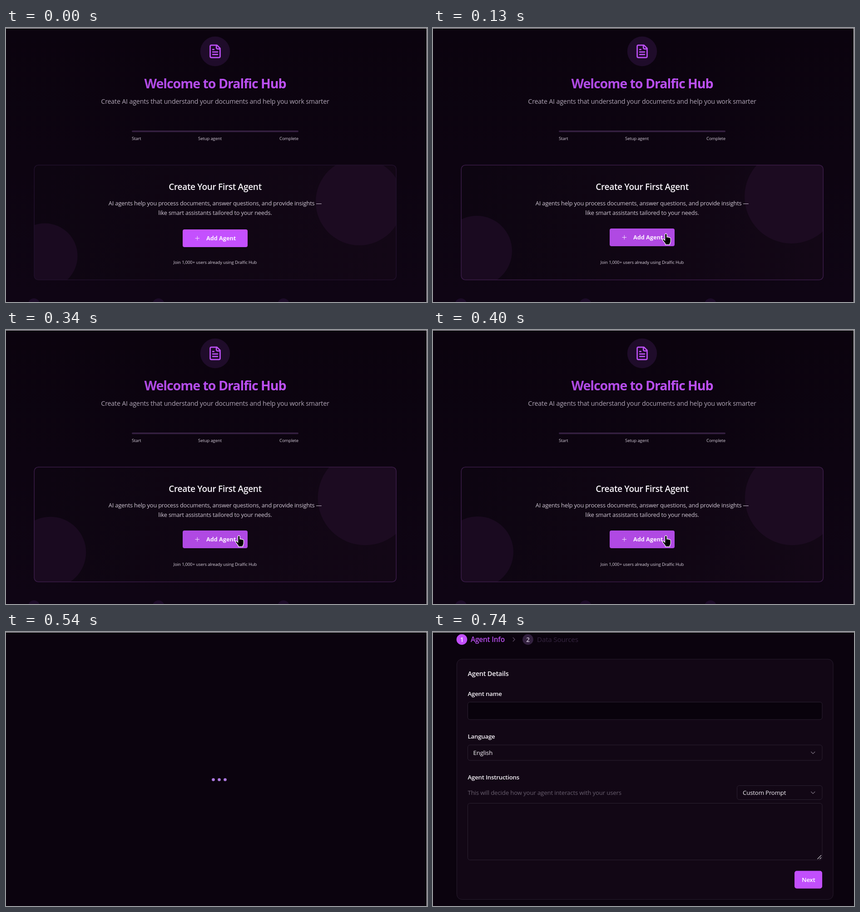
Write an HTML page with a canvas that moves like this. It is 927 px wide and 604 px high and loops after 1.67 s.

```html
<!DOCTYPE html>
<html lang="en">
<head>
<meta charset="utf-8">
<title>Agent setup</title>
<style>
html, body { margin: 0; width: 100%; height: 100%; overflow: hidden; background: #0b030e; }
canvas { display: block; }
</style>
</head>
<body>
<canvas id="stage" width="927" height="604"></canvas>
<script>
const ctx = document.getElementById('stage').getContext('2d');
const W = 927, H = 604, LOOP = 1670;
const ACCENT = '#c24ffc', BACK = '#0b030e', LINE = '#2b2131';

// Start time in ms and hover progress of the welcome card
const HOVER = [[0, 0], [70, 0.6], [130, 0.76], [200, 0.81], [340, 0.86], [400, 0.9], [470, 0.94]];
const LOADER_AT = 540, FORM_AT = 740;

const FILE_ICON = new Path2D('M15 2H6a2 2 0 0 0-2 2v16a2 2 0 0 0 2 2h12a2 2 0 0 0 2-2V7Z' +
  'M14 2v4a2 2 0 0 0 2 2h4M10 9H8M16 13H8M16 17H8');
const HAND = new Path2D('M510.6 455q2.2-3.6 4.4 0V461q2.2-1.2 3.2.5q2-1 3 .8q2.2-.4 2.2 2V470' +
  'q-.3 3-2 5V477.6H511.6V475.4L505.6 467.6q-.6-3 2-2.4L510.6 468Z');

const mix = (a, b, p) => a + (b - a) * p;
const blend = (a, b, p) => `rgb(${a.map((v, i) => Math.round(mix(v, b[i], p)))})`;

function gradient(x0, y0, x1, y1, from, to) {
  const g = ctx.createLinearGradient(x0, y0, x1, y1);
  g.addColorStop(0, from);
  g.addColorStop(1, to);
  return g;
}

function text(str, x, y, size, color, { weight = 400, align = 'left', track } = {}) {
  const px = size * 0.97;
  const em = track ?? (weight >= 700 ? 0 : weight >= 600 ? -0.017 : -0.0134);
  ctx.font = `${weight} ${px}px "Open Sans", "Noto Sans", sans-serif`;
  ctx.letterSpacing = `${em * px}px`;
  ctx.textAlign = align;
  ctx.fillStyle = color;
  ctx.fillText(str, x, y);
}

function disc(x, y, r, color) {
  ctx.beginPath();
  ctx.arc(x, y, r, 0, Math.PI * 2);
  ctx.fillStyle = color;
  ctx.fill();
}

function box(x, y, w, h, r, fill, stroke, width = 1) {
  ctx.beginPath();
  ctx.roundRect(x, y, w, h, r);
  if (fill) {
    ctx.fillStyle = fill;
    ctx.fill();
  }
  if (stroke) {
    ctx.strokeStyle = stroke;
    ctx.lineWidth = width;
    ctx.stroke();
  }
}

function polyline(color, width, ...pts) {
  ctx.beginPath();
  pts.forEach(([x, y]) => ctx.lineTo(x, y));
  ctx.strokeStyle = color;
  ctx.lineWidth = width;
  ctx.stroke();
}

function backdrop(fill, rightEdge) {
  ctx.fillStyle = fill;
  ctx.fillRect(0, 0, W, H);
  ctx.fillStyle = '#d2cfd4';
  ctx.fillRect(0, 0, W, 1);
  if (rightEdge) ctx.fillRect(W - 1, 0, 1, H);
}

function header() {
  disc(460.5, 51.5, 32.7, '#1f0c2a');
  ctx.save();
  ctx.translate(460.5, 51.5);
  ctx.scale(1.365, 1.365);
  ctx.translate(-12, -12);
  ctx.lineWidth = 2;
  ctx.lineCap = ctx.lineJoin = 'round';
  ctx.strokeStyle = '#bd50f5';
  ctx.stroke(FILE_ICON);
  ctx.restore();

  const mid = { align: 'center' };
  text('Welcome to Dralfic Hub', 460.5, 132.5, 29.5, gradient(303, 0, 618, 0, '#ae4ae2', '#bf51f8'),
    { weight: 700, align: 'center', track: -0.037 });
  text('Create AI agents that understand your documents and help you work smarter',
    460.5, 167, 14.74, '#b0a5b6', mid);

  box(277, 226, 367, 3.4, 1.7, '#352041');
  const label = '#d3cbd8';
  text('Start', 277, 246.5, 9.84, label);
  text('Setup agent', 449, 246.5, 9.84, label, mid);
  text('Complete', 644, 246.5, 9.84, label, { align: 'right' });
}

function welcomeCard(p) {
  const hovered = p > 0;
  const lift = Math.min(1, p / 0.7);

  ctx.save();
  box(61.5, 301.5, 798, 254, 9, gradient(62, 302, 860, 556, '#0d0511', '#130716'));
  ctx.clip();
  disc(mix(778, 793, p), mix(383, 368, p), mix(96, 105.6, p), '#1c0b21');
  disc(mix(85.5, 100, p), mix(502.5, 488, p), mix(72, 79.2, p), '#1a0a20');
  ctx.restore();
  box(62.2, 302.2, 797, 253, 9, null, blend([32, 16, 42], [56, 27, 69], lift), 1.6);

  const mid = { align: 'center' };
  text('Create Your First Agent', 460.5, 357, 19.7, '#f7f3f9', { weight: 600, align: 'center' });
  text('AI agents help you process documents, answer questions, and provide insights —',
    460.5, 390.5, 13.18, '#d2c9d6', mid);
  text('like smart assistants tailored to your needs.', 460.5, 411.7, 13.18, '#d2c9d6', mid);

  const dy = -2 * lift;
  box(389, 444 + dy, 143, 39, 4, blend([196, 80, 254], [176, 73, 227], lift));
  polyline('#f3e4fb', 1, [416.5, 463.5 + dy], [426, 463.5 + dy]);
  polyline('#f3e4fb', 1, [421.3, 458.7 + dy], [421.3, 468.2 + dy]);
  text('Add Agent', 441, 468.2 + dy, 13.1, '#fbf2ff', { weight: 700 });
  text('Join 1,000+ users already using Dralfic Hub', 460.5, 520, 9.84, '#d8d0dc', mid);

  if (hovered) {
    ctx.fillStyle = '#000';
    ctx.fill(HAND);
    ctx.strokeStyle = '#fff';
    ctx.lineWidth = 1.2;
    ctx.stroke(HAND);
  }
}

function welcome(p) {
  backdrop(gradient(0, 0, 0, H, BACK, '#0f0514'), true);
  header();
  welcomeCard(p);
  [61.5, 335.7, 611].forEach(x => disc(x, 609, 13.1, '#1d0c29'));
}

function loader(t) {
  backdrop(BACK, true);
  const color = t < 600 ? '#ad79e0' : '#b77cf6';
  [456.5, 469.5, 482.5].forEach(x => disc(x, 325.5, 3.3, color));
}

function chevronDown(x, y) {
  polyline('#8b8391', 1.1, [x - 4.5, y - 2.2], [x, y + 2.3], [x + 4.5, y - 2.2]);
}

function form() {
  const bold = { weight: 600 }, mid = { weight: 600, align: 'center' };
  const white = '#f6f2f8', fill = '#120715';
  backdrop(BACK, false);

  disc(63.5, 16.5, 11.8, ACCENT);
  text('1', 63.5, 21.5, 14, '#fff', mid);
  text('Agent Info', 83, 22, 16, '#b64eeb', bold);
  polyline('#5b4b64', 1.2, [175.8, 12], [180.2, 16.5], [175.8, 21]);
  disc(209, 16.5, 11.8, '#33213f');
  text('2', 209, 21.5, 14, '#cabfd1', mid);
  text('Data Sources', 229, 22, 15.7, '#352540');

  box(52.5, 60, 828.5, 529.5, 11, fill, '#281d2f');
  text('Agent Details', 76.5, 97.2, 15, white, bold);

  text('Agent name', 76.5, 140.7, 13.7, white, bold);
  box(76.5, 154.5, 780.5, 38.5, 5, '#09020c', LINE);

  text('Language', 76.5, 234.7, 13.7, white, bold);
  box(76.5, 249, 780.5, 34, 5, fill, LINE);
  text('English', 88.5, 270.8, 13.7, white);
  chevronDown(836.7, 266);

  text('Agent Instructions', 76.5, 324.7, 13.7, white, bold);
  text('This will decide how your agent interacts with your users', 76.5, 359, 13.7, '#675d6d');
  box(669.5, 338.5, 187.5, 31, 5, fill, LINE);
  text('Custom Prompt', 682, 359, 13.7, white);
  chevronDown(836.7, 354);

  box(76.5, 377.5, 780.5, 125, 5, fill, LINE);
  polyline('#c3bfc6', 1.3, [846.5, 500.5], [855, 492]);
  polyline('#c3bfc6', 1.3, [851.5, 500.5], [855, 497]);

  box(796, 526.5, 61, 39, 5, ACCENT);
  text('Next', 826.7, 551, 13.8, '#fff', mid);
}

function draw(t) {
  if (t >= FORM_AT) form();
  else if (t >= LOADER_AT) loader(t);
  else welcome(HOVER.findLast(([start]) => start <= t)[1]);
}

let begin;
function tick(now) {
  begin ??= now;
  draw(Math.max(0, now - begin) % LOOP);
  requestAnimationFrame(tick);
}
draw(0);
requestAnimationFrame(tick);
</script>
</body>
</html>
```
